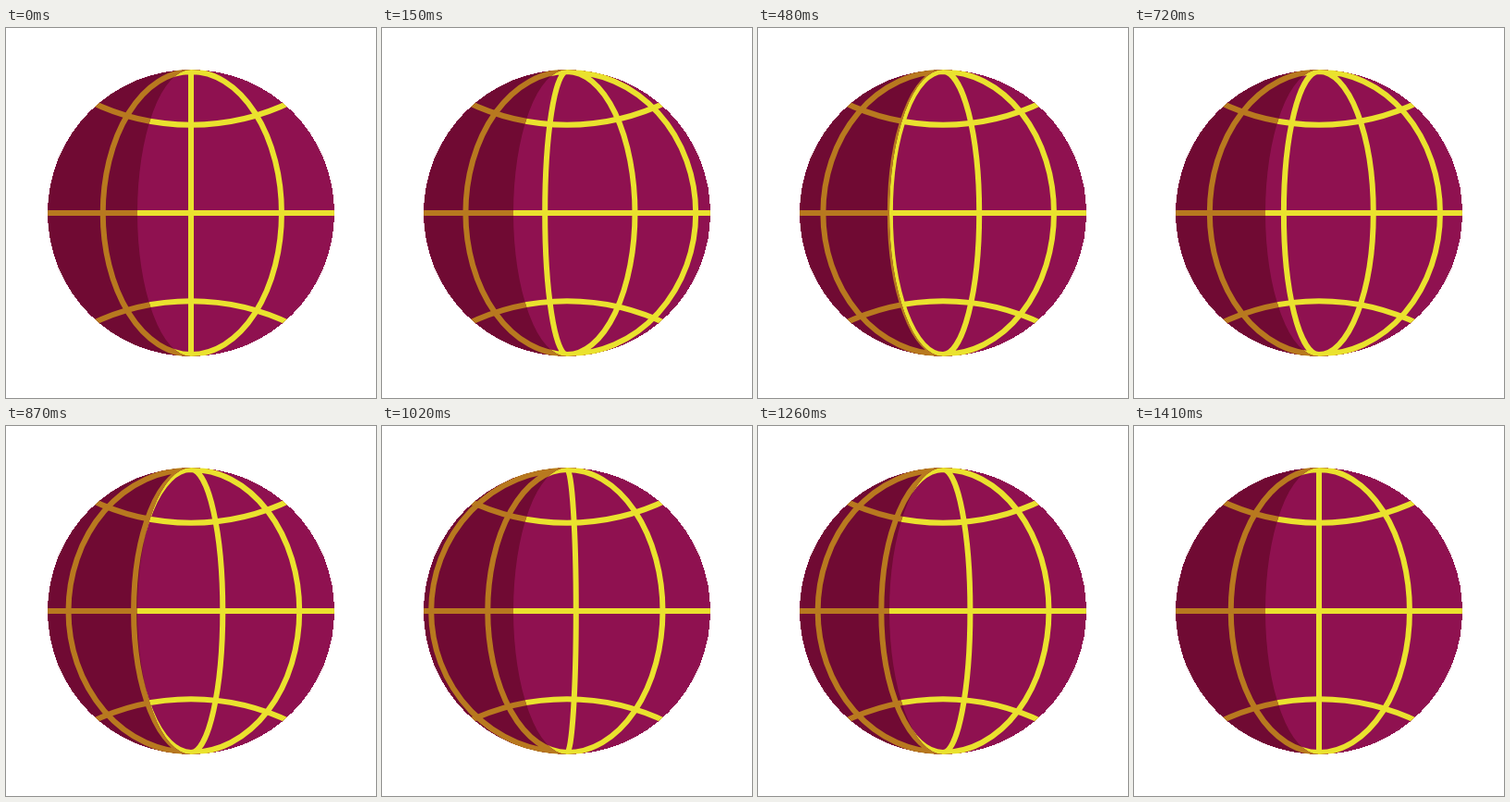
Write an HTML page that moves like this. It is 400x400 px and loops after 1440 ms.

```html
<!DOCTYPE html>
<html lang="en">
<head>
<meta charset="utf-8">
<title>Spinning globe</title>
<style>
  html, body { margin: 0; width: 100%; height: 100%; overflow: hidden; background: #fff; }
  svg { display: block; width: 100vw; height: 100vh; }
  .grid { fill: none; stroke-width: 6; stroke-linecap: round; }
</style>
</head>
<body>
<svg viewBox="0 0 400 400">
  <defs>
    <clipPath id="ball"><circle cx="200" cy="200" r="155"/></clipPath>
    <clipPath id="dusk"><path d="M200 45A155 155 0 0 0 200 355A58 155 0 0 1 200 45Z"/></clipPath>
    <path id="parallels" d="M45 200H355M90 79A248 248 0 0 0 310 79M90 321A248 248 0 0 1 310 321"/>
    <path id="meridians"/>
    <g id="grid" class="grid"><use href="#parallels"/><use href="#meridians"/></g>
  </defs>
  <circle cx="200" cy="200" r="155" fill="#8f1150" shape-rendering="crispEdges"/>
  <g clip-path="url(#ball)">
    <use href="#grid" stroke="#eae22e"/>
    <g clip-path="url(#dusk)">
      <rect width="400" height="400" fill="#700a33"/>
      <use href="#grid" stroke="#b8791f"/>
    </g>
  </g>
</svg>
<script>
const LOOP = 1440, STEP = 30, SPIN_END = 1400, TURN = 200;
// Equator offsets each meridian travels between in one turn
const stops = [-152.6, -95.3, 0, 98, 153];
const meridians = document.getElementById('meridians');

function arc(x) {
  if (Math.abs(x) < 0.01) return 'M200 47V353';
  return `M200 47A${Math.abs(x)} 153 0 0 ${x > 0 ? 1 : 0} 200 353`;
}

function draw(ms) {
  const tick = Math.floor((ms % LOOP) / STEP) * STEP;
  const p = (Math.min(tick, SPIN_END) % TURN) / TURN;
  let d = '';
  for (let i = p ? 0 : 1; i < stops.length - 1; i++) {
    d += arc(stops[i] + (stops[i + 1] - stops[i]) * p);
  }
  meridians.setAttribute('d', d);
}

const start = performance.now();
function frame() {
  draw(performance.now() - start);
  requestAnimationFrame(frame);
}
draw(0);
requestAnimationFrame(frame);
</script>
</body>
</html>
```
